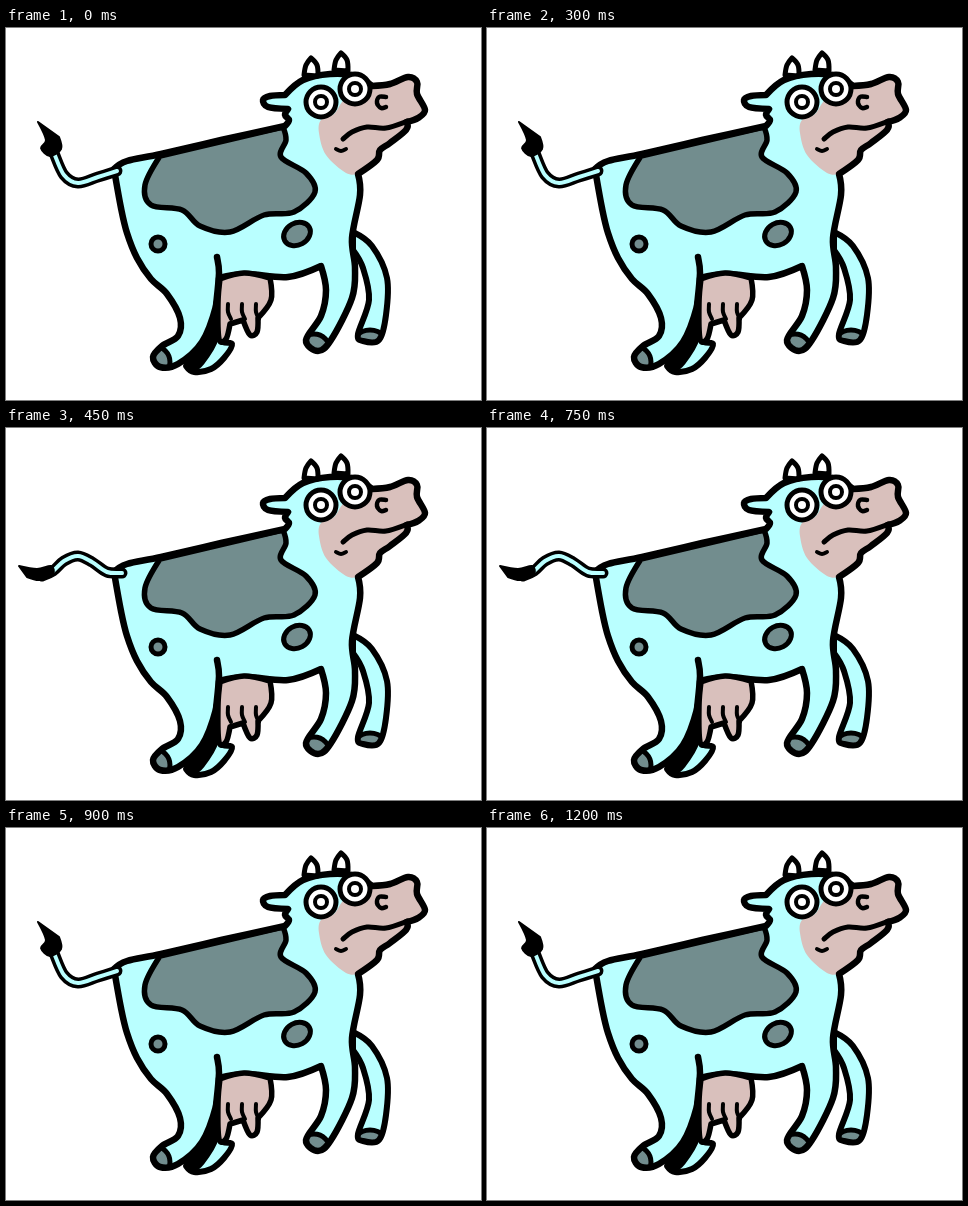
An HTML page with a canvas for the animation above (1.35 s loop, 475 by 372 pixels).

```html
<!DOCTYPE html>
<html lang="en">
<head>
<meta charset="utf-8">
<title>Cow</title>
<style>
html, body { margin: 0; width: 100%; height: 100%; overflow: hidden; background: #fff }
canvas { display: block }
</style>
</head>
<body>
<canvas id="stage" width="475" height="372"></canvas>
<script>
const ctx = document.getElementById('stage').getContext('2d');
const HIDE = '#b9ffff', GREY = '#728d8e', PINK = '#d9c0bc', INK = '#000';
const LOOP = 1350, STEP = 150, BOB = 3;

// Smooth curve through "x,y" points; a trailing "!" makes a sharp corner.
function curve(text, closed = true) {
  const pts = text.split(' ').map(s => {
    const [x, y] = s.split(',').map(parseFloat);
    return { x, y, sharp: s.endsWith('!') };
  });
  const n = pts.length, path = new Path2D();
  const at = i => pts[closed ? (i + n) % n : Math.max(0, Math.min(n - 1, i))];
  const slope = (i, axis) => at(i).sharp ? 0 : (at(i + 1)[axis] - at(i - 1)[axis]) / 6;
  path.moveTo(pts[0].x, pts[0].y);
  for (let i = 0; i < (closed ? n : n - 1); i++) {
    const p = at(i), q = at(i + 1);
    path.bezierCurveTo(p.x + slope(i, 'x'), p.y + slope(i, 'y'),
      q.x - slope(i + 1, 'x'), q.y - slope(i + 1, 'y'), q.x, q.y);
  }
  if (closed) path.closePath();
  return path;
}

function oval(x, y, rx, ry = rx, turn = 0) {
  const path = new Path2D();
  path.ellipse(x, y, rx, ry, turn, 0, 2 * Math.PI);
  return path;
}

function paint(path, fill, width, color = INK) {
  if (fill) { ctx.fillStyle = fill; ctx.fill(path); }
  if (width) { ctx.lineWidth = width; ctx.strokeStyle = color; ctx.stroke(path); }
}

const line = (text, width) => paint(curve(text, false), null, width);

// The hoof is the part of a leg that lies within a circle around the toe.
function hoof(leg, x, y, r) {
  ctx.save();
  ctx.clip(leg);
  paint(oval(x, y, r), GREY, 5);
  ctx.restore();
}

const snout = '366,58! 384,56 402,49 411,54 411,66 419,82 412,90 401,94! 400,102 384,115 374,122 371,132 352,146!';
const body = curve('108,141! 121,133 155,126 215,112 279,98! 283,92 279,87 282,81! 262,79 257,72 264,68 279,67! 297,52 324,46 350,48 '
  + snout + ' 354,167 346,210 349,240 346,270 325,312 312,323 300,312 315,288 320,262 315,238! 282,249 240,246 213,250! '
  + '210,278 196,314 172,336 154,339 147,329 156,318 172,308 174,290 161,266 145,251 131,230 121,205 115,180');
const muzzle = curve(snout + ' 340,145 320,127 313,105 315,92 328,86 338,72 352,68');
const patch = curve('154,128! 139,157 145,177 176,182 194,198 224,204 258,187 288,184 309,164 300,145 275,129 280,112 277,99!');
const udder = curve('214,251! 238,245 264,250! 265,272 252,290! 251,304 244,307 237,292! 224,296! 220,311 213,311 212,275');
const farFront = curve('347,204! 366,218 381,250 380,287 373,312 357,313 352,306 363,272 357,240 347,222!');
const farBack = curve('207,288! 214,312 226,316 218,330 205,341 188,344 180,338!');
const shade = curve('208,292! 211,311 197,335 186,343 180,338!');
const horn = curve('-7,17! -5,7 0,0! 6,7 7,18!');

const tails = [
  { rope: curve('111,143 92,149 72,155 58,147 48,125', false),
    tuft: curve('32,94! 53,109! 55,121 44,128 35,120 40,112') },
  { rope: curve('116,142 101,141 86,131 72,125 58,130 47,140 36,145', false),
    tuft: curve('13,135! 31,138 45,135 47,143 34,149 21,146!') }
];

function drawTail({ rope, tuft }) {
  paint(rope, null, 11);
  paint(rope, null, 4, HIDE);
  paint(tuft, INK, 2);
}

function drawHead() {
  for (const [x, y] of [[305, 30], [335, 25]]) {
    ctx.save();
    ctx.translate(x, y);
    paint(horn, '#fff', 5);
    ctx.restore();
  }
  for (const [x, y] of [[349, 61], [315, 74]]) {
    paint(oval(x, y, 15), '#fff', 5);
    paint(oval(x, y, 6), '#fff', 4);
  }
  line('380,69 373,69 371,75 375,80 380,79', 4.5);
  line('337,111 346,104 361,99 380,100 402,93', 5);
  line('330,121 335,123 340,121', 4);
}

function draw(pose) {
  ctx.setTransform(1, 0, 0, 1, 0, 0);
  ctx.fillStyle = '#fff';
  ctx.fillRect(0, 0, 475, 372);
  ctx.lineJoin = ctx.lineCap = 'round';
  ctx.translate(0, pose * BOB);

  paint(farFront, HIDE);
  hoof(farFront, 364, 322, 20);
  paint(farFront, null, 6);
  paint(farBack, HIDE, 6);
  paint(shade, INK, 3);

  paint(body, HIDE);
  paint(muzzle, PINK);
  paint(patch, GREY, 5.5);
  hoof(body, 308, 322, 16);
  hoof(body, 148, 334, 16);
  paint(body, null, 6.5);
  drawTail(tails[pose]);

  paint(oval(152, 216, 7), GREY, 5);
  paint(oval(291, 206, 14, 11, -0.5), GREY, 5);
  paint(udder, PINK, 5.5);
  for (const x of [222, 236, 250]) line(`${x},276 ${x},284 ${x + 3},291`, 4);
  line('211,229 213,245 210,278', 6.5);
  drawHead();
}

function tick() {
  const step = Math.floor(performance.now() % LOOP / STEP);
  draw(step % 2);
  requestAnimationFrame(tick);
}
tick();
</script>
</body>
</html>
```
